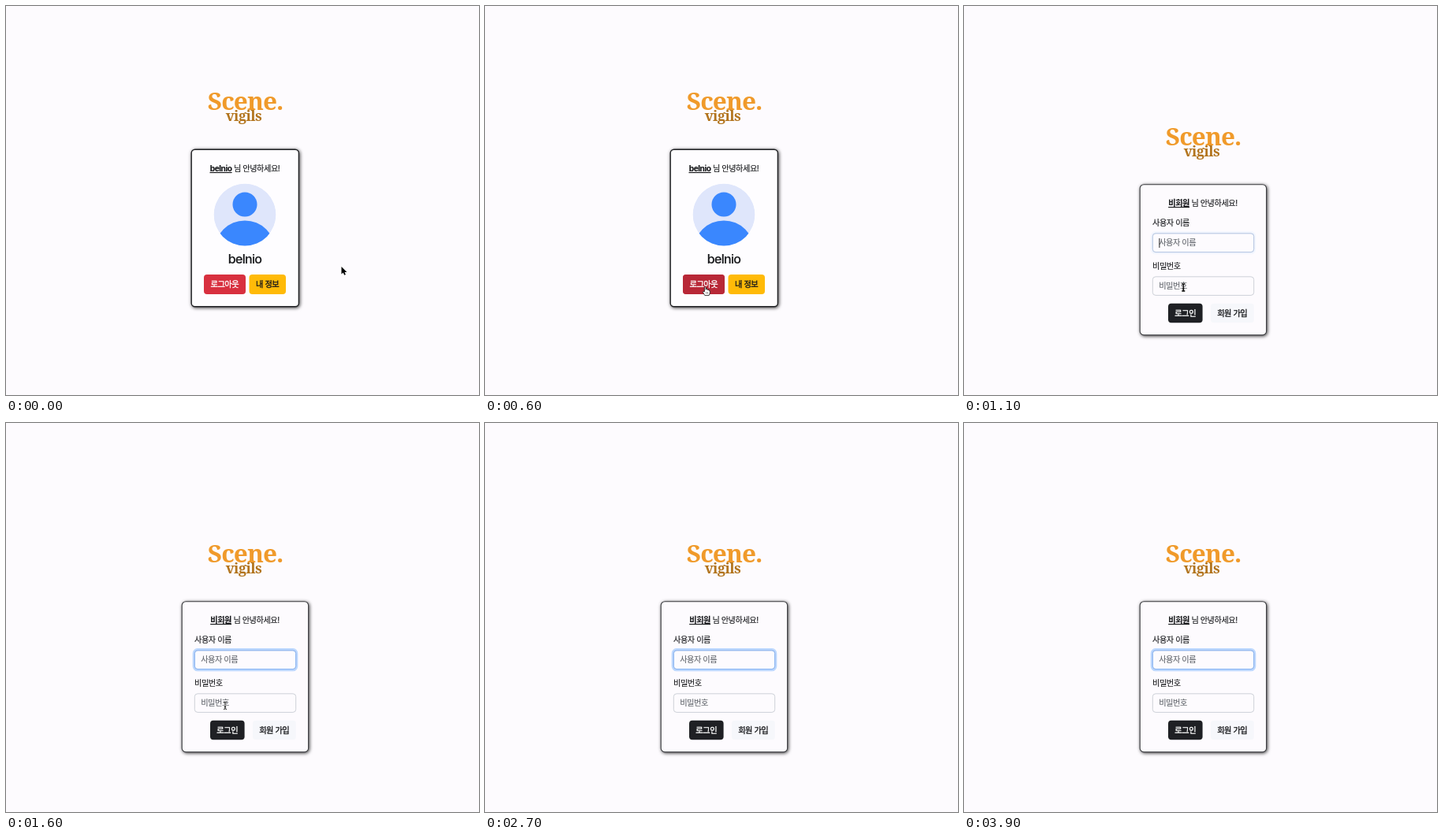
An HTML page that plays this animation: 600x494 px, repeating every 4 s.

```html
<!DOCTYPE html>
<html lang="ko">
<head>
<meta charset="utf-8">
<title>로그아웃</title>
<style>
  html, body { margin: 0; width: 100%; height: 100%; overflow: hidden; background: #fdfbfe; }
  svg { display: block; width: 100%; height: 100%; }
  text { font: 400 10.2px Inter, "Noto Sans CJK KR", "Noto Sans CJK", sans-serif; letter-spacing: -.045em; fill: #17181b; stroke: #17181b; stroke-width: .12px; }
  .mid { text-anchor: middle; }
  .user { font-weight: 700; text-decoration: underline; }
  .btn { text-anchor: middle; stroke-width: .32px; }
  .light { fill: #fff; stroke: #fff; }
  .hint { fill: #62666c; stroke: #62666c; }
  .name { font-size: 16px; font-weight: 500; }
  .logo text { font: 700 31.5px "Noto Serif", serif; letter-spacing: -.03em; fill: #f09a2a; stroke: none; }
  .logo .sub { font-size: 18px; fill: #b2741d; }
  .card { filter: drop-shadow(1px 1.5px 2px rgba(0, 0, 0, .75)); }
</style>
</head>
<body>
<svg viewBox="0 0 600 494">
  <defs>
    <clipPath id="disc"><circle cx="303" cy="265" r="39.5"/></clipPath>
  </defs>
  <rect width="600" height="494" fill="#fdfbfe"/>

  <g class="logo" id="logo">
    <text class="mid" x="303.5" y="132">Scene.</text>
    <text class="mid sub" x="301.5" y="146">vigils</text>
  </g>

  <g id="profile">
    <rect class="card" x="235.2" y="182.2" width="136.2" height="199.6" rx="4.5" fill="#fefdff" stroke="#202124" stroke-width="1.4"/>
    <text class="mid" x="303" y="210"><tspan class="user">belnio</tspan> 님 안녕하세요!</text>
    <g clip-path="url(#disc)">
      <circle cx="303" cy="265" r="39.5" fill="#dfe6fb"/>
      <circle cx="303" cy="311" r="38.6" fill="#3a87fe"/>
    </g>
    <circle cx="303" cy="252" r="15.5" fill="#3a87fe"/>
    <text class="mid name" x="303" y="326.5">belnio</text>
    <rect x="251" y="341" width="53" height="25" rx="4" fill="#d8303f"/>
    <rect id="redDark" x="251" y="341" width="53" height="25" rx="4" fill="#ae2635"/>
    <text class="btn light" x="277.3" y="357.3">로그아웃</text>
    <rect x="308.5" y="341" width="46.5" height="25" rx="4" fill="#ffba08"/>
    <rect id="goldLight" x="308.5" y="341" width="46.5" height="25" rx="4" fill="#ffc82b"/>
    <text class="btn" x="331.7" y="357.3">내 정보</text>
  </g>

  <g id="login">
    <rect class="card" x="223.2" y="226.7" width="160.4" height="191.2" rx="5" fill="#fdfbfe" stroke="#3a3b3f" stroke-width="1.1"/>
    <text class="mid" x="303" y="254"><tspan class="user">비회원</tspan> 님 안녕하세요!</text>
    <text x="239" y="279">사용자 이름</text>
    <rect id="ring" x="238" y="287.4" width="131" height="26.6" rx="5" fill="none" stroke="#bdd8fe" stroke-width="2.6"/>
    <rect x="239.3" y="288.8" width="128.4" height="23.8" rx="3.8" fill="#fdfbfe" stroke="#cdd1d8"/>
    <rect id="edge" x="239.3" y="288.8" width="128.4" height="23.8" rx="3.8" fill="none" stroke="#80b1f8"/>
    <text class="hint" x="247.2" y="304.3">사용자 이름</text>
    <path id="caret" d="M247.9 295V307" stroke="#222" stroke-width="1"/>
    <text x="239" y="334">비밀번호</text>
    <rect x="239.3" y="343.8" width="128.4" height="23.6" rx="3.8" fill="#fdfbfe" stroke="#cdd1d8"/>
    <text class="hint" x="247.2" y="359.3">비밀번호</text>
    <rect x="259" y="377.8" width="43.6" height="24.4" rx="4" fill="#1f2024"/>
    <text class="btn light" x="280.7" y="393.7">로그인</text>
    <rect x="313" y="377.8" width="54.8" height="24.4" rx="4" fill="#f6f7fb"/>
    <text class="btn" x="340.2" y="393.7">회원 가입</text>
  </g>

  <g id="pointer">
    <path id="arrow" d="M0 0V9.5L2.2 7.5 3.7 10.8 5.4 10.1 4 6.9H6.9Z" fill="#000" stroke="#fff" stroke-width=".9" paint-order="stroke"/>
    <g id="hand" stroke="#111" stroke-width=".8" stroke-linejoin="round">
      <path d="M-.9 6.2V.8Q0-.6 .9 .8V3.6Q2-.1 2.9 4Q4.2 3.2 4.7 4.6Q6 4.2 6 5.6V8L4.8 11H-.4L-3 6.8Q-2.7 5.2-.9 6.2Z" fill="#fff"/>
      <path d="M1.4 6.5V9M3.2 6.5V9" fill="none" stroke-width=".5"/>
    </g>
    <g id="beam" fill="none">
      <path d="M-2-4.5Q0-4.5 0-3.3Q0-4.5 2-4.5M0-3.3V3.5M-2 4.7Q0 4.7 0 3.5Q0 4.7 2 4.7M-1.2 1.7H1.2" stroke="#fff" stroke-width="2"/>
      <path id="beamLine" d="M-2-4.5Q0-4.5 0-3.3Q0-4.5 2-4.5M0-3.3V3.5M-2 4.7Q0 4.7 0 3.5Q0 4.7 2 4.7M-1.2 1.7H1.2" stroke="#111"/>
    </g>
  </g>
</svg>
<script>
  const LOOP = 4000, STEP = 100, SWAP = 1100;
  const $ = id => document.getElementById(id);
  const show = (id, on) => $(id).setAttribute("visibility", on ? "inherit" : "hidden");
  const fade = (id, value) => $(id).setAttribute("opacity", value);

  // Linear interpolation over [time, ...values] keys.
  function track(keys, t) {
    const next = keys.findIndex(key => key[0] > t);
    if (next === 0) return keys[0].slice(1);
    if (next < 0) return keys[keys.length - 1].slice(1);
    const a = keys[next - 1], b = keys[next];
    const k = (t - a[0]) / (b[0] - a[0]);
    return a.slice(1).map((v, i) => v + (b[i + 1] - v) * k);
  }

  const pointerPath = [
    [0, 425.5, 331], [100, 415, 334], [200, 379, 342], [300, 328, 352],
    [400, 302.4, 356], [500, 285, 356.8], [600, 279.3, 356.6], [1000, 279.3, 356.6],
    [1100, 278.3, 357.3], [1200, 278, 358.8], [2200, 278, 358.8],
    [2300, 331, 329], [2400, 409, 288], [2500, 508, 236], [2600, 612, 182]
  ];
  const goldHover = [[200, 0], [300, 1], [400, .5], [500, 0]];
  const redHover = [[400, 0], [500, .5], [600, .75], [800, .75], [900, 1]];
  const focus = [[1075, 0], [1225, 1]];

  function draw(t) {
    const loggedOut = t >= SWAP;
    show("profile", !loggedOut);
    show("login", loggedOut);
    $("logo").setAttribute("transform", `translate(0 ${loggedOut ? 44.7 : 0})`);

    fade("goldLight", track(goldHover, t)[0]);
    fade("redDark", track(redHover, t)[0]);
    const glow = track(focus, t)[0];
    fade("ring", glow);
    fade("edge", Math.min(1, glow * 2));
    show("caret", loggedOut && (t - SWAP) % 1000 < 500);

    const [x, y] = track(pointerPath, t);
    $("pointer").setAttribute("transform", `translate(${x} ${y})`);
    show("arrow", t < 500 || t >= 2300);
    show("hand", t >= 500 && t < SWAP);
    show("beam", loggedOut && t < 2300);
    $("beamLine").setAttribute("stroke-width", t < SWAP + STEP ? 1.5 : 1);
  }

  const start = performance.now();
  function tick() {
    const t = (performance.now() - start) % LOOP;
    draw(Math.floor(t / STEP) * STEP);
    requestAnimationFrame(tick);
  }
  tick();
</script>
</body>
</html>
```
